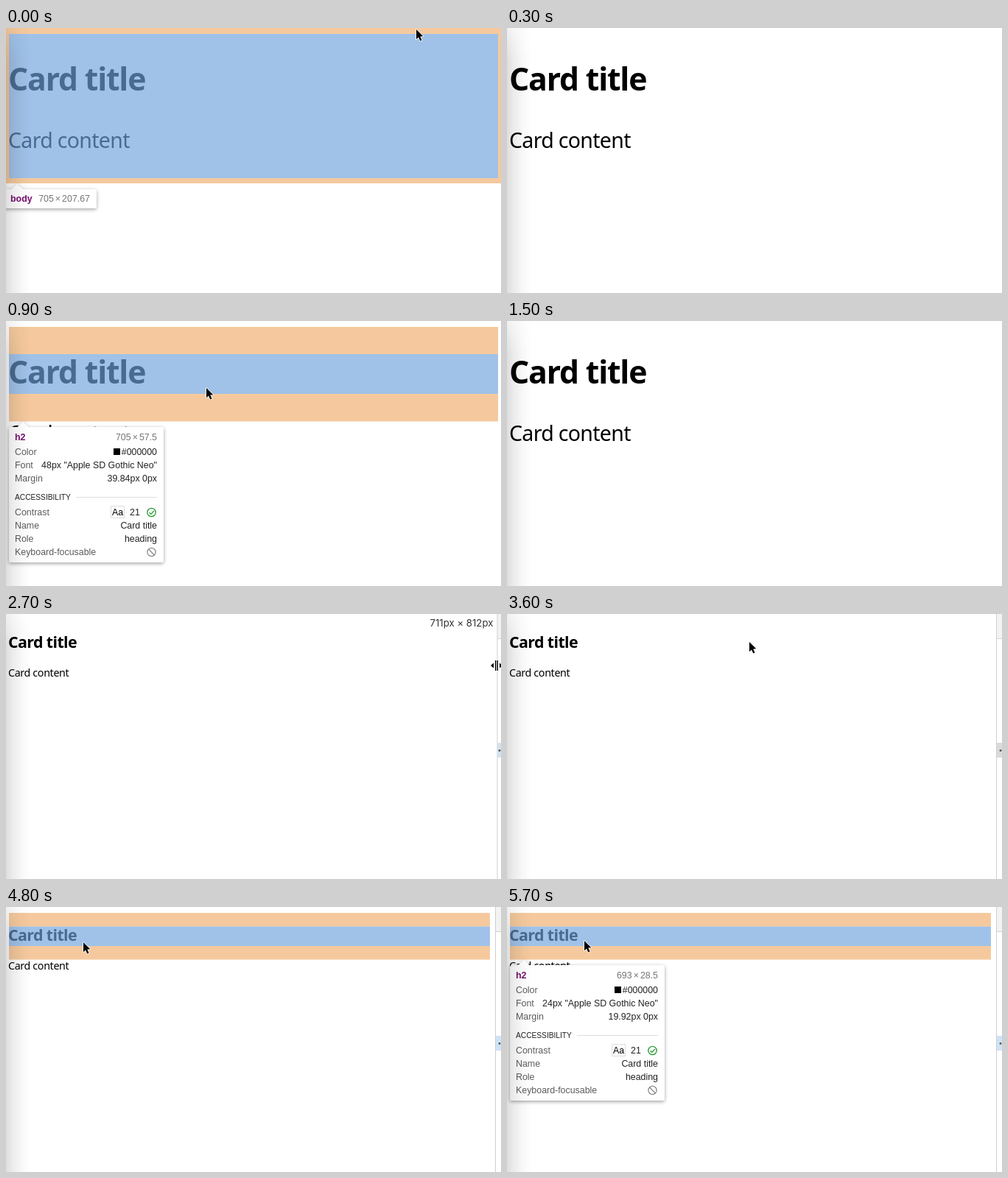
An HTML page that plays this animation: 672x360 px, repeating every 6000 ms.

```html
<!DOCTYPE html>
<html lang="en">
<head>
<meta charset="utf-8">
<title>Card inspection</title>
<style>
html, body { margin: 0; width: 100%; height: 100%; overflow: hidden; background: #fff; }
svg { display: block; width: 672px; height: 360px; }
text { white-space: pre; }
.page { font-family: "Noto Sans", "Open Sans", sans-serif; font-variant-ligatures: none; fill: #000; }
.title { font-weight: 700; letter-spacing: -.028em; }
.body { font-weight: 400; letter-spacing: -.024em; }
.tip { font: 12.4px "Liberation Sans", Arial, sans-serif; }
.tag { font-weight: 700; fill: #7a1070; }
.key { fill: #5c5c5c; }
.val { fill: #222; }
.dim { fill: #757575; }
.size { font: 13.2px Inter, sans-serif; fill: #333; }
</style>
</head>
<body>
<svg id="stage" viewBox="0 0 672 360" xmlns="http://www.w3.org/2000/svg">
  <defs>
    <linearGradient id="edge">
      <stop offset="0" stop-opacity=".13"/>
      <stop offset=".3" stop-opacity=".07"/>
      <stop offset=".65" stop-opacity=".025"/>
      <stop offset="1" stop-opacity="0"/>
    </linearGradient>
    <linearGradient id="fade" x2="0" y2="1">
      <stop offset="0" stop-color="#777"/>
      <stop offset=".12" stop-color="#fff"/>
    </linearGradient>
    <mask id="top"><rect width="34" height="360" fill="url(#fade)"/></mask>
    <filter id="drop" x="-20%" y="-30%" width="140%" height="170%">
      <feDropShadow dx="0" dy="1.5" stdDeviation="2.5" flood-opacity=".38"/>
    </filter>
  </defs>
  <rect width="672" height="360" fill="#fff"/>
  <g id="page"></g>
  <g id="marks"></g>
  <g id="tip"></g>
  <g id="panel"></g>
  <rect width="34" height="360" fill="url(#edge)" mask="url(#top)"/>
  <g id="pointer"></g>
</svg>
<script>
const LOOP = 6000;
const MARGIN = 'rgba(240,174,107,.66)';
const CONTENT = 'rgba(111,163,220,.66)';
const BLUE = '#cfe3f6', GREY = '#dadada';

// Each step overrides the one before it; keys stay until changed.
const steps = [
  { at: 0, small: false, mark: 'body', tip: 'body', cursor: [557, 2], edge: null, size: '', row: BLUE },
  { at: 300, mark: '', tip: '', cursor: null },
  { at: 600, mark: 'h2', tip: 'h2' },
  { at: 900, cursor: [272, 91] },
  { at: 1500, mark: '', tip: '', cursor: null },
  { at: 2400, size: '721px × 812px', cursor: [668, 67, 'resize'] },
  { at: 2700, small: true, edge: 667, size: '711px × 812px', cursor: [666, 70, 'resize'] },
  { at: 3000, edge: 664.5, size: '709px × 812px', cursor: [664, 72, 'resize'] },
  { at: 3300, cursor: null },
  { at: 3600, size: '', row: GREY, cursor: [329, 38] },
  { at: 3900, cursor: [209, 72] },
  { at: 4200, cursor: [167, 36] },
  { at: 4500, row: BLUE, cursor: null },
  { at: 4800, mark: 'h2', cursor: [105, 48] },
  { at: 5100, tip: 'h2', cursor: [105, 46] }
];

const rect = (x, y, w, h, fill, more = '') =>
  `<rect x="${x}" y="${y}" width="${w}" height="${h}" fill="${fill}" ${more}/>`;
const text = (x, y, str, cls, more = '') =>
  `<text x="${x}" y="${y}" class="${cls}" ${more}>${str}</text>`;
const END = 'text-anchor="end"';
const box = (w, h) => `${w}<tspan dx="2">×</tspan><tspan dx="2">${h}</tspan>`;

function page(small) {
  const px = small ? 14.25 : 28.5;
  const line = (y, scale, cls, str) =>
    text(3, y, str, 'page ' + cls, `font-size="${px * scale}"`);
  return line(small ? 46 : 84.5, 1.5, 'title', 'Card title') +
    line(small ? 85 : 163, 1, 'body', 'Card content');
}

function marks(kind, small) {
  if (kind === 'body') {
    return `<path d="M0 0H672V211H0ZM4 8V204H668V8Z" fill="${MARGIN}"/>` +
      rect(4, 8, 664, 196, CONTENT);
  }
  if (kind !== 'h2') return '';
  const w = small ? 653 : 664;
  const [a, b, c] = small ? [26.5, 53, 71.5] : [45, 99, 136.5];
  return rect(4, 8, w, a - 8, MARGIN) + rect(4, a, w, b - a, CONTENT) + rect(4, b, w, c - b, MARGIN);
}

// White bubble with an arrow on its upper edge.
const bubble = (x, y, w, h) =>
  `<path filter="url(#drop)" fill="#fff" d="M${x + 3} ${y}h8.5l7.5 -7l7.5 7h${w - 29.5}q3 0 3 3v${h - 6}` +
  `q0 3 -3 3h${6 - w}q-3 0 -3 -3v${6 - h}q0 -3 3 -3z"/>`;

function bodyTip() {
  return bubble(-4, 219, 127, 26) + text(6, 236, 'body', 'tip tag') +
    text(114, 236, box(705, 207.67), 'tip dim', END);
}

function titleTip(small) {
  const y = small ? 79 : 144;
  const rows = [
    [38, 'Color', '#000000'],
    [56, 'Font', `${small ? 24 : 48}px "Apple SD Gothic Neo"`],
    [74, 'Margin', `${small ? 19.92 : 39.84}px 0px`],
    [120, 'Contrast', ''],
    [138, 'Name', 'Card title'],
    [156, 'Role', 'heading'],
    [174, 'Keyboard-focusable', '']
  ];
  const lines = rows.map(([dy, key, val]) =>
    text(12, dy, key, 'tip key') + text(205, dy, val, 'tip val', END)).join('');
  return bubble(4, y, 210, 184) + `<g transform="translate(0 ${y})">` +
    text(12, 17.5, 'h2', 'tip tag') +
    text(205, 17.5, small ? box(693, 28.5) : box(705, 57.5), 'tip dim', END) +
    lines + rect(146, 29, 9, 9, '#000') +
    text(12, 99, 'ACCESSIBILITY', 'tip val', 'style="font-size:10.2px"') +
    rect(95, 95, 110, 1, '#ddd') +
    rect(142.5, 107.5, 18, 16, '#fff', 'stroke="#ddd"') +
    text(144, 120, 'Aa', 'tip', 'fill="#000"') + text(168, 120, '21', 'tip val') +
    `<g fill="none" stroke-width="1.3"><g stroke="#249a32"><circle cx="197.5" cy="116" r="5.7"/>` +
    `<path d="M194.6 116.2l2.2 2.2l4 -4.4"/></g>` +
    `<g stroke="#8a8a8a"><circle cx="197.5" cy="170" r="5.6"/><path d="M193.6 166l7.8 8"/></g></g></g>`;
}

function panel(edge, size, row) {
  const right = edge || 675.5;
  let out = size ? text(right - 5.6, 17, size, 'size', END) : '';
  if (edge) {
    const w = 672 - edge;
    out += rect(edge, 0, w, 360, '#fff') + rect(edge, 0, w, 33, '#f3f3f3') +
      rect(edge, 33, w, 1, '#d0d0d0') + rect(edge + .5, 175, w, 20, row) +
      rect(edge - .5, 0, 1, 360, '#cfcfcf') +
      '<circle cx="670" cy="185.5" r="1.4" fill="#555"/>';
  }
  return out;
}

function pointer(cursor) {
  if (!cursor) return '';
  const [x, y, kind] = cursor;
  const d = kind
    ? 'M-2 -7h1.4v14h-1.4zM.6 -7h1.4v14h-1.4zM-8 0l4 -3.5v7zM8 0l-4 -3.5v7z'
    : 'M0 0V13.2L3 10.4L5.3 15.4L7.5 14.4L5.3 9.6L9.3 9.3Z';
  return `<path transform="translate(${x} ${y})" d="${d}" fill="#000" stroke="#fff" ` +
    'stroke-width="1.6" stroke-linejoin="round" paint-order="stroke"/>';
}

const put = (id, html) => { document.getElementById(id).innerHTML = html; };
let shown = -1;

function draw(time) {
  const t = time % LOOP;
  const count = steps.filter(s => s.at <= t).length;
  if (count === shown) return;
  shown = count;
  const s = Object.assign({}, ...steps.slice(0, count));
  put('page', page(s.small));
  put('marks', marks(s.mark, s.small));
  put('tip', s.tip === 'body' ? bodyTip() : s.tip ? titleTip(s.small) : '');
  put('panel', panel(s.edge, s.size, s.row));
  put('pointer', pointer(s.cursor));
}

const start = performance.now();
function tick() {
  draw(performance.now() - start);
  requestAnimationFrame(tick);
}
tick();
</script>
</body>
</html>
```
